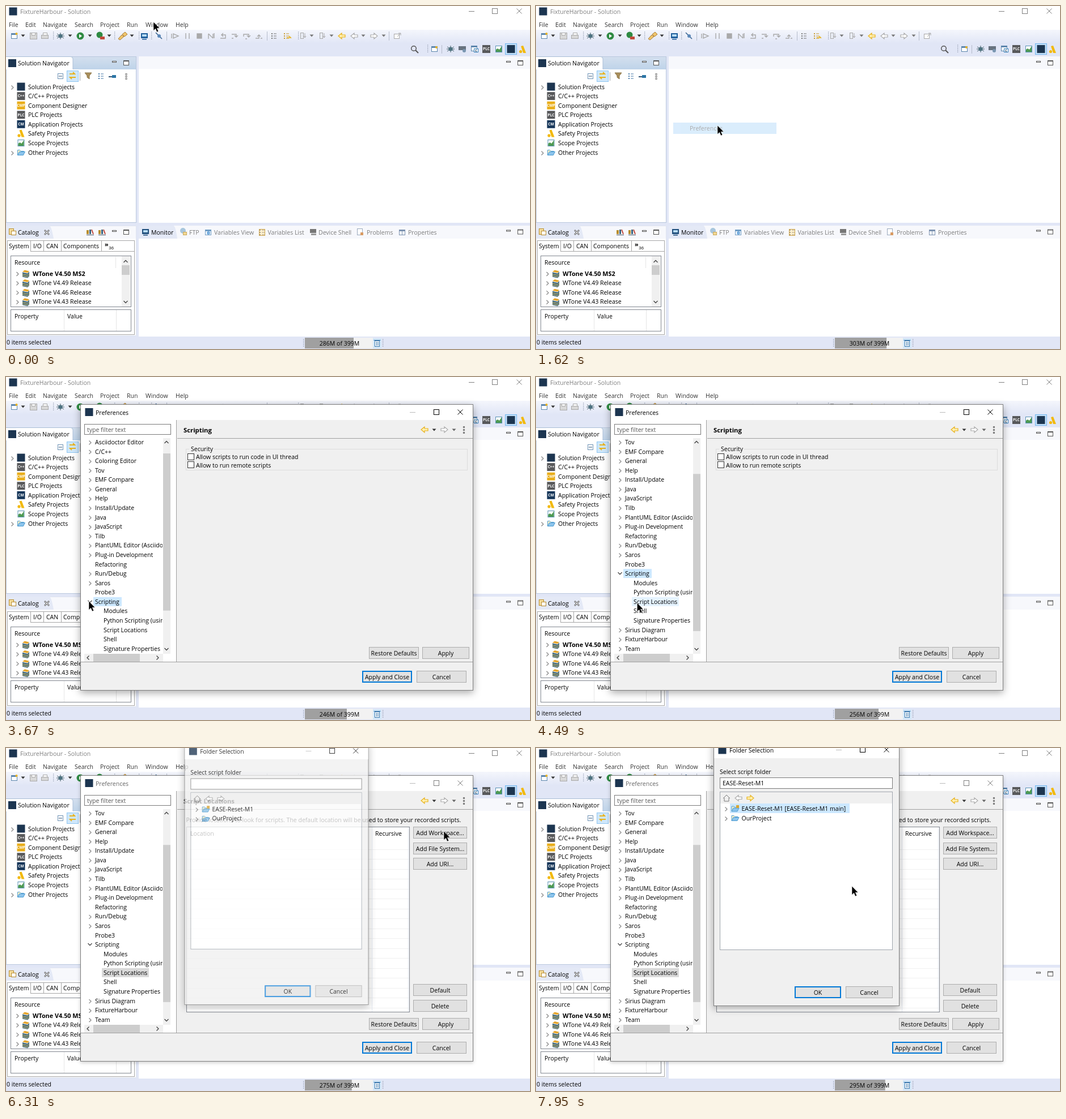
These frames come from a looping animation (924x606 px, 8 s). An HTML page:

```html
<!DOCTYPE html>
<html lang="en">
<head>
<meta charset="utf-8">
<title>Script locations</title>
<style>
html, body { margin: 0; width: 100%; height: 100%; overflow: hidden; background: #fff; }
svg { display: block; }
text { font: 10.5px "Open Sans", "Noto Sans", sans-serif; white-space: pre; }
.bold { font-weight: 700; font-size: 10.8px; }
.head { font-weight: 700; font-size: 11.3px; }
.mid { text-anchor: middle; }
.tiny { font-weight: 700; font-size: 6.5px; text-anchor: middle; }
.shadow { filter: drop-shadow(0 4px 7px #0005); }
.flat { filter: drop-shadow(0 2px 3px #0003); }
</style>
</head>
<body>
<svg id="stage" width="924" height="606" viewBox="0 0 924 606"></svg>
<script>
const LOOP = 8000, PITCH = 16.58;
const NAVY = '#1c3550', GRAY = '#a9a9a9', GOLD = '#e8b21c', BLUE = '#0078d7', PALE = '#f0f0f0';

// The screen only refreshes at these moments.
const STEPS = [0, 200, 400, 600, 820, 1020, 1220, 1420, 1620, 1840, 2040, 2260, 2460, 2660, 2860, 3060,
  3260, 3670, 3870, 4080, 4290, 4490, 4690, 4890, 5090, 5300, 5500, 5710, 5910, 6110, 6310, 6510, 6730,
  6930, 7530, 7740, 7950];
const POINTER = [[0, 260, 28], [600, 262, 31], [1220, 317, 203], [1420, 320, 211], [1840, 320, 211],
  [2460, 191, 394], [2660, 183, 399], [3060, 146, 396], [3670, 146, 396], [4290, 178, 399], [5090, 179, 399],
  [5710, 721, 159], [5910, 765, 148], [6110, 772, 147], [6310, 772, 147], [6930, 420, 104], [7530, 420, 104],
  [7740, 455, 135], [7950, 557, 244]];
const HEAP = [[0, 286], [1620, 303], [2040, 308], [2260, 232], [2660, 236], [3260, 243], [3670, 246],
  [4490, 256], [5710, 273], [6310, 275], [6930, 284], [7530, 290], [7950, 295]];

const TREE = ['Asciidoctor Editor', 'C/C++', 'Coloring Editor', 'Tov', 'EMF Compare', 'General', 'Help',
  'Install/Update', 'Java', 'JavaScript', 'Tilb', 'PlantUML Editor (Asciidoctor)', 'Plug-in Development',
  'Refactoring', 'Run/Debug', 'Saros', 'Probe3', 'Scripting', 'Sirius Diagram', 'FixtureHarbour', 'Team',
  'Validation', 'XML'];
const CHILDREN = ['Modules', 'Python Scripting (using Py4J)', 'Script Locations', 'Shell', 'Signature Properties'];
const LEAVES = ['Refactoring', 'Probe3', 'Validation'];

function sample(keys, t) {
  const i = keys.findIndex(k => k[0] > t);
  if (i < 0) return keys.at(-1).slice(1);
  const a = keys[i - 1], b = keys[i], f = (t - a[0]) / (b[0] - a[0]);
  return a.slice(1).map((v, n) => v + (b[n + 1] - v) * f);
}

// Drawing helpers; text is placed by its vertical centre.
const text = (x, y, s, cls = '', fill = '#000') =>
  `<text x="${x}" y="${y + 4}" class="${cls}" fill="${fill}">${s}</text>`;
const rect = (x, y, w, h, fill, stroke) => stroke
  ? `<rect x="${x + .5}" y="${y + .5}" width="${w - 1}" height="${h - 1}" fill="${fill}" stroke="${stroke}"/>`
  : `<rect x="${x}" y="${y}" width="${w}" height="${h}" fill="${fill}"/>`;
const path = (d, stroke, fill = 'none', w = 1) =>
  `<path d="${d}" stroke="${stroke}" fill="${fill}" stroke-width="${w}"/>`;
const disc = (x, y, r, fill) => `<circle cx="${x}" cy="${y}" r="${r}" fill="${fill}"/>`;
const each = (list, draw) => list.map(draw).join('');
const hline = (x, y, w, c) => rect(x, y, w, 1, c);
const vline = (x, y, h, c) => rect(x, y, 1, h, c);

const chevron = (x, y, dir = 'right', c = '#8a8a8a') => path({
  right: `M${x - 1.5} ${y - 3.5}l3.5 3.5-3.5 3.5`, left: `M${x + 1.5} ${y - 3.5}l-3.5 3.5 3.5 3.5`,
  down: `M${x - 3.5} ${y - 2}l3.5 3.5 3.5-3.5`, up: `M${x - 3.5} ${y + 2}l3.5-3.5 3.5 3.5`
}[dir], c, 'none', 1.3);
const drop = (x, y, c = '#333') => path(`M${x - 3.5} ${y - 1.5}h7l-3.5 4z`, 'none', c);
const grip = (x, y, n = 5) => each([...Array(n).keys()], i => rect(x, y - n * 1.5 + i * 3, 1.3, 1.3, '#8d97ab'));
const tag = (x, y, s, fill) => rect(x - 7, y - 7, 14, 14, fill) + text(x, y - 1.7, s, 'tiny', '#fff');
const logo = (x, y, size = 14) => rect(x - size / 2, y - size / 2, size, size, NAVY);
const arrow = (x, y, dir, c) =>
  path(`M${x + 6 * dir} ${y}l${-6 * dir}-5v3h${-6 * dir}v4h${6 * dir}v3z`, c, c === GOLD ? '#fff0b0' : '#fff', 1.2);
const sheet = (x, y, c) => rect(x - 5, y - 5, 11, 10, '#fff', c) + rect(x - 5, y - 5, 11, 3, c);
const lines = (x, y, c) => each([-4, 0, 4], d => rect(x - 4, y + d - 1, 2, 2, c) + hline(x, y + d - .5, 5, c));
const bug = (x, y) => path(`M${x - 6} ${y - 4}l12 8m0-8l-12 8m-1-4h14m-7-6v12`, '#47606a') + disc(x, y, 3.6, '#4d7280');
const screen = (x, y, c) => rect(x - 6, y - 5, 12, 9, c) + rect(x - 4, y - 3, 8, 4, '#b9dcf5') + rect(x - 4, y + 5, 8, 1.5, c);
const chart = (x, y) => rect(x - 6, y - 6, 12, 12, '#fff', '#5891b5') +
  path(`M${x - 5} ${y + 5}v-4l3-2 3 2 4-6v10z`, 'none', '#4e9a52');
const safety = (x, y) => path(`M${x - 3} ${y - 6}l4-1 5 13h-5z`, 'none', '#f2b90c') + disc(x - 3.5, y + 3.5, 2.6, '#f2b90c');
const books = (x, y) => path(`M${x - 6} ${y - 3}l4-3 8 2-3 3z`, 'none', '#e5a52c') +
  path(`M${x - 6} ${y - 2}l9 2 3-3v8l-3 3-9-2z`, 'none', '#376683') + path(`M${x - 6} ${y + 1}l9 2 3-3M${x - 6} ${y + 4}l9 2 3-3`, '#efc55a');
const folder = (x, y, c = '#4c9bd1') => path(`M${x - 6} ${y + 5}v-9h4l2 2h5v2`, c, '#fff3c4') +
  path(`M${x - 6} ${y + 5}l3-6h10l-3 6z`, c, '#8cc4ec');
const minMax = (x, y) => rect(x - 4, y - 3, 8, 3, '#fff', '#555') +
  rect(x + 16, y - 4, 10, 9, '#fff', '#555') + hline(x + 16, y - 3, 10, '#555');
const button = (x, y, w, label, ring) => rect(x, y, w, 21, '#e1e1e1', ring ? BLUE : '#adadad') +
  (ring === 2 ? rect(x + 1, y + 1, w - 2, 19, 'none', BLUE) : '') + text(x + w / 2, y + 10.5, label, 'mid');
const windowButtons = (y, min, max, close, c, minColor = c) => hline(min - 5, y, 10, minColor) +
  rect(max - 5, y - 5, 10, 10, 'none', c) + path(`M${close - 4.5} ${y - 4.5}l9 9m0-9l-9 9`, c);

function toolbar() {
  const y = 53;
  const dim = [[298, 'M-6-4v8m3-8v8l9-4z'], [320, 'M-3-5v10m6-10v10'], [341, 'M-4-4h8v8h-8z'],
    [362, 'M-5-4v9m0-9l8 8m0-8v8m2-9v9'], [383, 'M-5 4h9v-6h-7m3-3l-3 3 3 3'], [404, 'M-6-3h8v4m-3-2l3 3 3-3M-6 4h3'],
    [425, 'M-6 1v-4h9v4m-3-2l3 3 3-3M-3 5h3'], [446, 'M-6 4h6v-6m-3 3l3-3 3 3M3 4h3']];
  return sheet(14, y, '#5c86ad') + disc(18.5, 49, 2, GOLD) +
    rect(42, 47, 13, 12, '#d8d8d8', GRAY) + rect(45, 47, 7, 5, '#fff', GRAY) +
    rect(62, 51, 13, 7, '#d8d8d8', GRAY) + rect(65, 47, 8, 5, '#fff', GRAY) +
    bug(96, y) + disc(131, y, 6.5, '#2f8a43') + path('M129 49.5v7l5-3.5z', 'none', '#fff') +
    disc(165, 51, 5.5, '#2f8a43') + rect(166, 54, 8, 5, '#c0483b') +
    path('M198 58l6-7 4 3-7 6zM205 50l5-4 4 4-5 4z', '#a87b36', '#f0c66c') +
    screen(244, y, '#1f5f9c') + path('M264 47l11 11', '#35618f', 'none', 1.5) + disc(270, 53, 3, '#5b88b8') +
    each(dim, ([x, d]) => `<g transform="translate(${x} ${y})">${path(d, GRAY, x === 341 ? GRAY : 'none', 1.4)}</g>`) +
    lines(472, y, '#777') + lines(494, y, '#c79a2e') + path('M495 56h7l-3-3', GOLD, 'none', 1.6) +
    each([523, 557], x => rect(x - 4, 47, 6, 11, '#e9edf5', GRAY) + path(`M${x + 4} 48v8m-2-3l2 3 2-3`, GRAY)) +
    arrow(592, y, -1, GOLD) + arrow(614, y, -1, GRAY) + arrow(649, y, 1, GRAY) +
    rect(684, 49, 10, 9, '#fff', GRAY) + path('M690 54l6-6h-4m4 0v4', GRAY) +
    each([30, 113, 148, 182, 222], x => drop(x, 52)) + each([539, 574, 630, 666], x => drop(x, 52, '#777')) +
    each([83, 191, 234, 256, 515], x => grip(x, y)) + each([283, 460, 675], x => vline(x, 45, 16, '#b5bccb')) +
    path('M722 78l5 5', '#555', 'none', 2) + `<circle cx="719" cy="75" r="4.3" fill="none" stroke="#555" stroke-width="1.5"/>` +
    grip(743, 76) + sheet(755, 76, '#5c86ad') + disc(759, 73, 2, GOLD) + vline(768, 69, 15, '#b5bccb') +
    bug(784, 76) + rect(798, 71, 13, 7, '#67727f') + disc(808, 79, 3, '#7996b1') +
    sheet(825, 75, '#5c86ad') + rect(825, 75, 8, 7, '#fff', '#357fb8') + text(829, 77, 'c', 'tiny', '#246') +
    tag(847, 76, 'PLC', '#58595b') + chart(869, 76) + rect(880, 66, 21, 20, '#c5e1fa', '#70b5ee') + logo(890.5, 76) + safety(911, 77);
}

function navigator() {
  const rows = ['Solution Projects', 'C/C++ Projects', 'Component Designer', 'PLC Projects',
    'Application Projects', 'Safety Projects', 'Scope Projects', 'Other Projects'];
  const icons = [logo, (x, y) => tag(x, y, 'C++', '#58595b'), (x, y) => tag(x, y, 'CMP', '#e9ae1b'),
    (x, y) => tag(x, y, 'PLC', '#58595b'), (x, y) => tag(x, y, 'CM', '#17375a'), safety, chart, folder];
  const y = i => 142.5 + i * PITCH;
  return rect(0, 89, 230, 294, '#fff', '#b9c8dd') + rect(1, 90, 228, 22, 'url(#tab)') +
    path('M0 112V89.5h114q4 0 4 4V112z', 'none', '#fff') + path('M0 89.5h114q4 0 4 4V112', '#a9bdd6') +
    logo(11, 101) + text(21, 101, 'Solution Navigator') + minMax(191, 100) +
    rect(91, 119, 10, 10, '#fff', '#6f93b5') + hline(93, 123.5, 6, '#357') +
    rect(107, 114, 21, 20, '#cfe7fb', '#8fc5f0') + path('M112 120h9l-3-3m5 9h-10l3 3', GOLD, 'none', 2) +
    vline(130, 117, 15, '#aaa') + path('M139 118h12l-4 5v6l-4-3v-3z', '#8a7446', '#a98e5b') +
    lines(167, 124, '#4679a8') + path('M181 125h6', '#357', 'none', 2) + rect(187, 122, 7, 5, '#2d76a6') +
    each([119, 123, 127], v => rect(210.5, v, 3, 3, 'none', '#666')) +
    each(rows, (s, i) => icons[i](26.5, y(i)) + text(39, y(i), s)) + chevron(11, 144) + chevron(11, 260);
}

function catalog() {
  const y = i => 472.5 + i * PITCH;
  return rect(0, 388, 230, 195, '#fff', '#dfe4f0') + rect(1, 389, 228, 22, '#f7f8fc') +
    path('M0 411V388h76q4 0 8 23z', 'none', '#e4e9f6') +
    rect(5, 393, 9, 11, '#f6dfa0', '#b98d2d') + rect(9, 397, 9, 8, '#fff', '#b98d2d') + text(21, 400, 'Catalog') +
    path('M68 396l8 8m0-8l-8 8', '#666', 'none', 2.6) + path('M68.5 396.5l7 7m0-7l-7 7', '#fff') +
    each([148, 169], x => rect(x - 6, 396, 4, 7, '#b98d2d') + rect(x - 1, 395, 3, 8, '#376683') +
      path(`M${x + 3} 395l3 8`, '#c0483b', 'none', 2) + hline(x - 6, 404, 13, '#456')) + minMax(191, 399) +
    rect(2, 414, 225, 167, '#fff', '#a6a6a6') + hline(43, 433, 183, '#a6a6a6') +
    each([43, 66, 97, 168], x => vline(x, 414, 20, '#a6a6a6')) +
    text(5, 424, 'System') + text(48, 424, 'I/O') + text(71, 424, 'CAN') + text(101, 424, 'Components') +
    text(174, 421, '»', 'bold') + `<text x="181" y="430" style="font-size:8px">36</text>` +
    rect(8, 441, 213, 91, '#fff', '#828790') + text(15, 453, 'Resource') + vline(193, 443, 20, '#e5e5e5') +
    rect(204, 442, 15, 89, PALE) + rect(204, 458, 14, 17, '#cdcdcd') + chevron(211, 451, 'up', '#444') + chevron(211, 523, 'down', '#444') +
    each(['50 MS2', '49 Release', '46 Release', '43 Release'], (s, i) => chevron(20, y(i) + 1) +
      books(35, y(i)) + text(47, y(i), 'WTone V4.' + s, i ? '' : 'bold')) +
    rect(8, 536, 213, 39, '#fff', '#828790') + text(15, 548, 'Property') + text(108, 548, 'Value') +
    vline(102, 537, 37, '#e5e5e5') + vline(194, 537, 37, '#e5e5e5');
}

function bottomViews() {
  const c = '#7d7d7d';
  return rect(234, 388, 690, 196, '#fff') + rect(234, 388, 690, 23, '#f7f8fc') +
    path('M234 411V388h61q4 0 7 23z', 'none', '#e4e9f6') +
    screen(246, 399, '#1f4f7c') + text(256, 400, 'Monitor') +
    disc(312, 397, 5, '#a8c6dd') + rect(312, 399, 7, 6, '#f3d890', '#c9a95e') + text(323, 400, 'FTP', '', c) +
    sheet(356, 400, '#6f9cc4') + disc(357, 401, 3, '#79aede') + text(367, 400, 'Variables View', '', c) +
    rect(446, 394, 11, 12, '#fff3cf', '#d3ab4d') + lines(451, 400, '#a98') + text(461.5, 400, 'Variables List', '', c) +
    rect(536, 394, 11, 7, '#777') + rect(538, 402, 9, 3, '#999') + text(551, 400, 'Device Shell', '', c) +
    rect(619, 393, 10, 12, '#fff', '#9aa9bd') + rect(625, 400, 5, 5, '#d99b63') + text(636, 400, 'Problems', '', c) +
    sheet(698, 400, '#7d93b0') + vline(698, 398, 6, '#7d93b0') + text(709, 400, 'Properties', '', c) + minMax(886, 398.5);
}

function workbench(active) {
  const c = active ? '#000' : '#808080';
  const menus = [[5, 'File'], [34, 'Edit'], [65, 'Navigate'], [121, 'Search'], [166, 'Project'], [213, 'Run'], [246, 'Window'], [299, 'Help']];
  return rect(0, 0, 924, 606, '#e1e6f6') + rect(0, 0, 924, 42, '#fff') + rect(0, 42, 924, 24, 'url(#bar)') +
    logo(12.5, 9.5) + text(25, 10, 'FixtureHarbour - Solution', '', c) + windowButtons(9, 821, 862, 905, c) +
    (active ? rect(239, 24, 54, 18, '#cce8ff', '#99d1ff') : '') +
    each(menus, ([x, s]) => text(x, 33, s, '', '#333')) + toolbar() +
    rect(234, 89, 690, 294, '#fff') + rect(234, 89, 690, 22, '#f7f8fc') + minMax(886, 100) +
    navigator() + catalog() + bottomViews();
}

function statusBar(heap) {
  return text(1, 594, '0 items selected') + grip(524, 596) + rect(527, 586, 120, 19, '#f2f2f2') +
    rect(527, 586, heap / 399 * 120, 19, '#a0a0a0') + text(588, 595.5, `${Math.round(heap)}M of 399M`, 'mid') +
    rect(647, 587, 15, 18, '#d3e7f8') + rect(650, 591, 9, 11, '#fff', '#3977ad') + hline(648.5, 590, 12, '#3977ad') +
    vline(653, 593, 7, '#3977ad') + vline(655.5, 593, 7, '#3977ad') + grip(664, 596);
}

function windowMenu(t, pointerY) {
  const items = [['New Window', 53], ['Editor', 73], ['Appearance', 93], ['Show View', 120], ['Perspective', 140],
    ['Navigation', 167], ['Toolbar', 187], ['Preferences', 215.5]];
  const item = ([s, y], lit) => (lit ? rect(242, y - 9.5, 182, 20, '#91c9f7') : '') + text(271, y, s) +
    (/^(Ed|App|Sh|Per|Nav)/.test(s) ? chevron(415, y, 'right', '#333') : '');
  if (t >= 1620) return `<g opacity=".33">${item(items[7], true)}</g>`;
  return `<g opacity="${t < 600 ? .7 : 1}"><g class="flat">${rect(239, 41, 188, 188, '#f2f2f2', '#ccc')}</g>` +
    each([106, 153, 201], y => hline(267, y, 156, '#d7d7d7')) +
    each(items, it => item(it, Math.abs(pointerY + 3 - it[1]) < 10)) + '</g>';
}

function preferenceTree(t) {
  const open = t >= 3060, top = t >= 3870 ? 3 : 0, total = open ? 29 : 24, located = t >= 5090;
  const names = open ? [...TREE.slice(0, 18), ...CHILDREN, ...TREE.slice(18)] : TREE;
  const row = (s, i) => {
    const y = 115 + i * PITCH, child = CHILDREN.includes(s);
    const mark = s === (located ? 'Script Locations' : 'Scripting');
    const hover = s === 'Script Locations' && t >= 4290;
    const fill = mark ? (t >= 6310 ? '#d9d9d9' : '#cce8ff') : '#e5f3ff';
    return (mark || hover ? rect(child ? 169 : 154, y - 8, child ? 83 : 50, 16, fill, mark && !open ? '#99d1ff' : '') : '') +
      (child || LEAVES.includes(s) ? '' : s === 'Scripting' && open ? chevron(148, y, 'down', '#333') : chevron(148, y + 1)) +
      text(child ? 172 : 157, y, s);
  };
  return `<svg x="138" y="106" width="138" height="383" viewBox="138 106 138 383">${each(names.slice(top, top + 23), row)}</svg>` +
    rect(277, 108, 13, 381, PALE) + rect(277, 123 + 350 * (top + 1) / total, 13, 350 * 23 / total, '#cdcdcd') +
    chevron(283, 115, 'up', '#444') + chevron(283, 481, 'down', '#444') +
    rect(138, 489, 139, 14, PALE) + rect(154, 489, open ? 82 : 87, 14, '#cdcdcd') +
    chevron(145, 496, 'left', '#444') + chevron(267, 496, 'right', '#444');
}

function scriptingPage() {
  return rect(317, 127, 497, 38, 'none', '#dcdcdc') + rect(323, 122, 44, 10, PALE) + text(326, 127, 'Security') +
    each([[141, 'Allow scripts to run code in UI thread'], [155.5, 'Allow to run remote scripts']],
      ([y, s]) => rect(320, Math.floor(y) - 6, 12, 12, '#fff', '#333') + text(335, y, s));
}

function locationsPage(t) {
  return text(317.5, 127, 'Provide locations to look for scripts. The default location will be used to store your recorded scripts.') +
    rect(318, 139, 394, 328, '#fff', '#828790') +
    each([...Array(17).keys()], i => hline(319, Math.round(179 + i * 17.48), 392, '#f0f0f0')) +
    vline(645, 140, 326, '#e5eaf2') + vline(709, 140, 326, '#e5eaf2') +
    text(325, 151, 'Location') + text(651, 151, 'Recursive') +
    button(718, 139, 95, 'Add Workspace...', t >= 5910 && t < 6310) + button(718, 167, 95, 'Add File System...') +
    button(718, 194, 95, 'Add URI...') + button(718, 417, 95, 'Default') + button(718, 445, 95, 'Delete');
}

function preferences(t) {
  const located = t >= 5090, active = t < 6310, c = active ? '#000' : '#808080';
  return `<g opacity="${t < 2260 ? .75 : 1}"><g class="${active ? 'shadow' : 'flat'}">${rect(131, 48, 693, 506, PALE, '#7d7d7d')}</g>` +
    rect(132, 49, 691, 27, '#fff') + rect(132, 76, 168, 427, '#fff') + logo(146.5, 62) +
    text(158, 62.5, 'Preferences', '', active ? '#000' : '#666') + windowButtons(62, 717, 759, 801, c, '#bbb') +
    rect(138, 83, 153, 19, '#fff', '#7a7a7a') + text(143, 93, 'type filter text', '', '#555') + preferenceTree(t) +
    vline(300, 76, 427, '#a0a0a0') + hline(302, 108, 521, '#a0a0a0') + hline(132, 503, 691, '#a0a0a0') +
    text(313, 94, located ? 'Script Locations' : 'Scripting', 'head') +
    arrow(738, 93, -1, GOLD) + drop(755, 93) + arrow(773, 93, 1, GRAY) + drop(790, 93, '#666') +
    each([87, 92, 97], y => rect(806, y, 3, 3, 'none', '#666')) + (located ? locationsPage(t) : scriptingPage()) +
    button(640, 477, 88, 'Restore Defaults') + button(734, 477, 83, 'Apply') +
    button(628, 519, 88, 'Apply and Close', 2) + button(724, 519, 88, 'Cancel') + '</g>';
}

function folderDialog(t) {
  const ready = t >= 6510, picked = t >= 7530;
  const motion = ready ? '' : 'opacity=".77" transform="translate(477 228) scale(.991) translate(-477 -228)"';
  return `<g ${motion}><g class="shadow">${rect(313, -12, 328, 468, PALE, '#7d7d7d')}</g>` +
    rect(314, -11, 326, 29, '#fff') + logo(328.5, 3.5) + text(341, 4, 'Folder Selection') +
    windowButtons(3, 534, 576, 618, '#000', '#bbb') + text(324, 41.5, 'Select script folder') +
    rect(324, 52, 305, 20, '#fff', '#7a7a7a') + (picked ? text(329, 62, 'EASE-Reset-M1') : '') +
    rect(324, 77, 305, 280, '#fff', '#a0a6ae') + rect(325, 78, 303, 20, PALE) +
    path('M330 89l6-6 6 6m-10-1v6h8v-6', '#777') + arrow(357, 88.5, -1, GRAY) + arrow(378, 88.5, 1, picked ? GOLD : GRAY) +
    (picked ? rect(342, 98, 211, 17, '#cce8ff') : '') +
    chevron(335, 108) + folder(351, 107) + rect(353, 101, 5, 5, '#d9a532') +
    text(362.5, 107, 'EASE-Reset-M1' + (t >= 6730 ? ' [EASE-Reset-M1 main]' : '')) +
    chevron(335, 125) + folder(351, 123.5) + text(362.5, 123.5, 'OurProject') +
    button(456, 421, 82, 'OK', 2) + button(546, 421, 83, 'Cancel') + '</g>';
}

function scene(t) {
  const [x, y] = sample(POINTER, t), [heap] = sample(HEAP, t);
  return `<defs><linearGradient id="bar" x2="0" y2="1"><stop stop-color="#f4f6fc"/><stop offset="1" stop-color="#e1e6f6"/></linearGradient>
    <linearGradient id="tab" x2="0" y2="1"><stop stop-color="#d3dfee"/><stop offset="1" stop-color="#bed3e9"/></linearGradient></defs>` +
    workbench(t >= 400 && t < 1620) + statusBar(heap) +
    (t >= 400 && t < 1840 ? windowMenu(t, y) : '') +
    (t >= 2040 ? preferences(t) : '') + (t >= 6310 ? folderDialog(t) : '') +
    `<g transform="translate(${x} ${y})">${path('M0 0V15.5L3.6 12.2 6 18 8.8 16.8 6.3 11.3H11Z', '#fff', '#000', .6)}</g>`;
}

const stage = document.getElementById('stage');
let shown = -1;
function frame() {
  const now = performance.now() % LOOP;
  const step = STEPS.findLast(s => s <= now);
  if (step !== shown) stage.innerHTML = scene(shown = step);
  requestAnimationFrame(frame);
}
frame();
</script>
</body>
</html>
```
